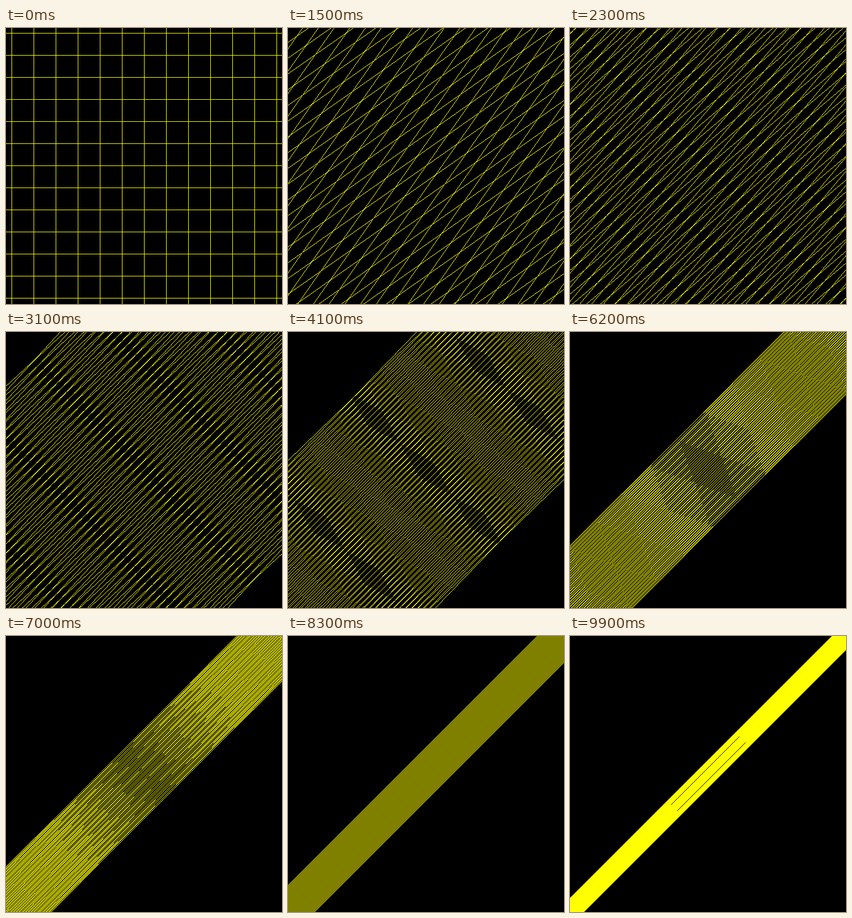
Animation, 500 px wide and 500 px high, one loop 10 s. Source, as an HTML page with a canvas:

```html
<!DOCTYPE html>
<html>
<head>
<meta charset="utf-8">
<style>
  html, body { margin: 0; width: 100%; height: 100%; overflow: hidden; background: #000; }
  canvas { display: block; width: 100vw; height: 100vh; image-rendering: pixelated; }
</style>
</head>
<body>
<canvas id="stage" width="500" height="500"></canvas>
<script>
const SIZE = 500, STEP = 100, STEPS = 100;
const CELL = 40, COUNT = 24;
const CENTER = { x: 250, y: 249 };
const DECADES = 3.5; // how far the speed closes in on 1 during a loop
const ctx = document.getElementById('stage').getContext('2d');

// A grid boosted to the given speed: both line families cross on the shrinking
// diagonal and lean towards 45 degrees. Each line is one hard pixel thick.
function drawGrid(speed) {
  const squeeze = Math.sqrt((1 - speed) / (1 + speed));
  ctx.fillStyle = '#000';
  ctx.fillRect(0, 0, SIZE, SIZE);
  ctx.fillStyle = '#ff0';
  for (let k = -COUNT; k <= COUNT; k++) {
    const shift = k * CELL * squeeze;
    const x = CENTER.x + shift, y = CENTER.y + shift;
    for (let i = 0; i < SIZE; i++) {
      ctx.fillRect(Math.round(x - (i - y) * speed), i, 1, 1);
      ctx.fillRect(i, Math.round(y - (i - x) * speed), 1, 1);
    }
  }
}

const start = performance.now();
let shown = -1;

function tick() {
  const step = Math.floor((performance.now() - start) / STEP) % STEPS;
  if (step !== shown) {
    drawGrid(1 - 10 ** (-DECADES * step / STEPS));
    shown = step;
  }
  requestAnimationFrame(tick);
}
tick();
</script>
</body>
</html>
```
